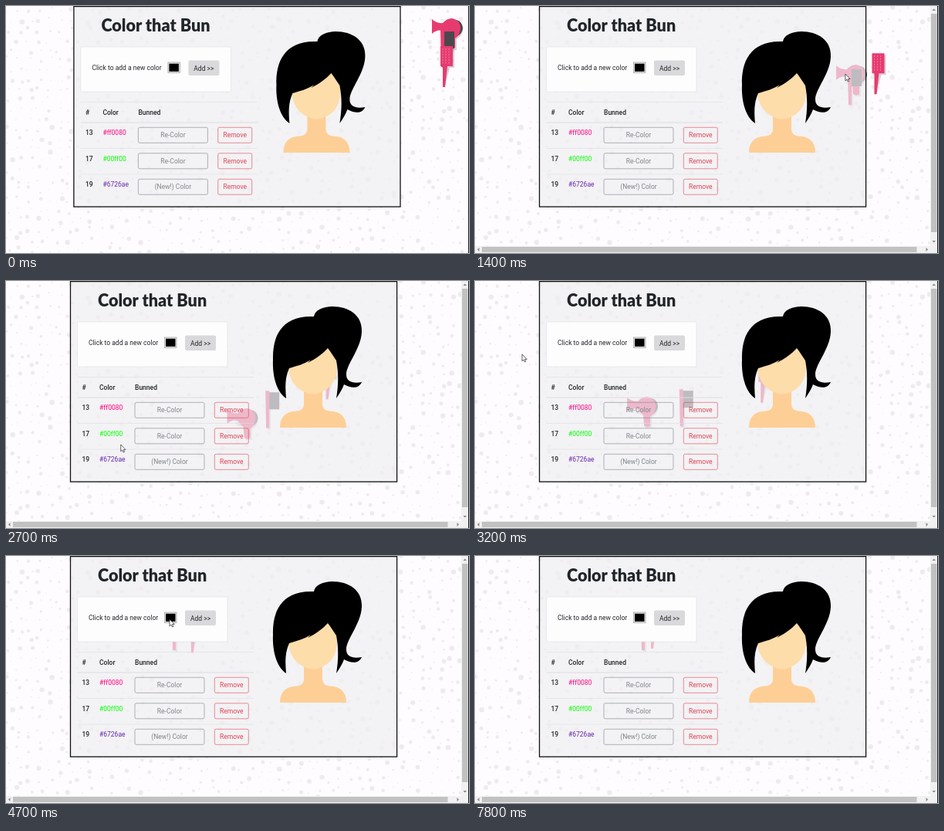
An HTML page for the animation above (8 s loop, 600 by 320 pixels).

```html
<!DOCTYPE html>
<html lang="en">
<head>
<meta charset="utf-8">
<title>Color that Bun</title>
<style>
  html, body { margin: 0; height: 100%; overflow: hidden; background: #fefcfe; }
  svg { display: block; width: 600px; height: 320px; font: 8.53px Roboto, sans-serif; fill: #212529; }
  .title { font: 900 21.6px Lato, sans-serif; }
  .strong { font-weight: 500; }
  .mid { text-anchor: middle; }
  .shadow { fill: #8b7d86; opacity: .35; }
  .pink { fill: #e73b70; }
  .dark { fill: #4b474c; }
</style>
</head>
<body>
<svg viewBox="0 0 600 320">
  <g id="dots" fill="#eeebef"></g>

  <g id="dryer">
    <path class="shadow" d="M12 9Q23 0 36 6Q44 14 36 24L32 27V41H24L22 25L12 21Z"/>
    <path class="dark" d="M32 2Q40 5 40 13Q39 20 33 23Z"/>
    <path class="pink" d="M0 1Q6 7 14 6Q19 0 26 0Q37 2 37 13Q36 22 30 26V38Q26 41 22 38L21 24Q17 21 14 16Q6 14 0 20Z"/>
  </g>
  <g id="comb">
    <path class="shadow" d="M2 2H18V22H7V50H2Z"/>
    <path class="dark" d="M4 2H18V24H4Z"/>
    <path class="pink" d="M0 0H5V48H1Z"/>
  </g>
  <g id="brush">
    <path class="shadow" d="M2 2H18V28H12L5 55V28H2Z"/>
    <path class="pink" d="M0 0H16V26H9L6 53H3V26H0Z"/>
    <path d="M3 3V24M7 3V24M11 3V24" stroke="#f17fa4" stroke-dasharray="2 1.5"/>
  </g>

  <g id="page">
    <rect x="83.5" y=".6" width="423.1" height="259.500" fill="#efeef1" fill-opacity=".7" stroke="#111" stroke-width="1.3"/>
    <text class="title" x="119" y="32.8">Color that Bun</text>

    <rect x="92.5" y="53" width="194.5" height="58" rx="1.5" fill="#fefdfe" stroke="#dfdde0" stroke-width=".6"/>
    <text x="107" y="83">Click to add a new color</text>
    <rect x="205.5" y="73" width="15.5" height="13.5" fill="#e6e5e7" stroke="#8a8a8a" stroke-width=".6"/>
    <rect x="207" y="74.700" width="12.5" height="10.2" fill="#000"/>
    <rect x="232" y="70.5" width="40" height="19.6" rx="2" fill="#d9d8da"/>
    <text class="mid" x="252" y="83.6">Add &gt;&gt;</text>

    <path d="M92.5 124.5H321M92.5 184.5H321M92.5 218H321" stroke="#dedfe3" stroke-width=".6"/>
    <path d="M92.5 151H321" stroke="#dedfe3" stroke-width="1.1"/>
    <g class="strong">
      <text x="98.5" y="140.8">#</text>
      <text x="121" y="140.8">Color</text>
      <text x="167" y="140.8">Bunned</text>
    </g>
    <g id="rows"></g>

    <path d="M386 138H410V160Q410 167 419 168.500Q441 169 441 190H355Q355 169 377 168.500Q386 167 386 160Z" fill="#fdcf96"/>
    <path d="M366 84H429V113Q428 134 411 143Q398 150 385 143Q368 134 366 113Z" fill="#fdddaa"/>
    <path fill="#000" d="M399 46C400 38 411 33 423 33C444 33 462 44 461 66C460 88 441 108 441 121
      C441 131 450 133 461 131C457 140 447 139 438 134C436 140 432 146 428 152C431 133 431 119 428 103
      C424 97 421 92 417 87C411 94 401 101 391 106L395 102C386 108 377 110 367 113
      C361 126 362 139 363 152C351 144 345 124 346 102C345 72 357 44 399 46Z"/>
  </g>

  <g id="bars">
    <path d="M590 0H600V320H0V311H590Z" fill="#f1f1f1"/>
    <path d="M591 10H598.500V293H591ZM9 312H572.500V319H9Z" fill="#c1c1c1"/>
    <path d="M592.500 6L594.700 3.500L597 6ZM592.500 304L594.700 306.500L597 304ZM5.500 313L3 315.500L5.500 318ZM584.500 313L587 315.500L584.500 318Z" fill="#888"/>
  </g>
  <path d="M599.500 0V320" stroke="#222"/>
  <path id="cursor" d="M0 0V8.800L2 7L3.400 10L4.800 9.400L3.500 6.500H6.200Z" fill="#fff" stroke="#222" stroke-width=".7"/>
</svg>
<script>
const LOOP = 8000, STEP = 10, ENTER = 300, SCROLLBARS_AT = 400, CURSOR_GONE_AT = 5000;
const el = id => document.getElementById(id);
const place = (id, x, y) => el(id).setAttribute('transform', `translate(${x.toFixed(2)} ${y.toFixed(2)})`);

// Mouse stops as [time, x, y]
const mouse = [[ENTER, 585, 18], [700, 545, 41], [1400, 480, 88], [1750, 425, 65], [2200, 323, 189],
               [2550, 190, 238], [3200, 61, 95], [4700, 212, 82]];

// The tools chase the mouse, each at its own top speed in px per second
const tools = [
  { id: 'dryer', start: [552, 16], offset: [-12, -12], speed: 185 },
  { id: 'comb', start: [563, 31], offset: [3, -8], speed: 145 },
  { id: 'brush', start: [563, 52], offset: [13, -15], speed: 90 }
];

// Smooth curve through the stops, at rest at both ends
function mouseAt(time) {
  const last = mouse.length - 1;
  const t = Math.min(Math.max(time, mouse[0][0]), mouse[last][0]);
  const i = Math.max(0, mouse.findIndex(stop => stop[0] >= t) - 1);
  const a = mouse[i], b = mouse[i + 1], span = b[0] - a[0], u = (t - a[0]) / span;
  const slope = (k, axis) => k === 0 || k === last ? 0 :
    (mouse[k + 1][axis] - mouse[k - 1][axis]) / (mouse[k + 1][0] - mouse[k - 1][0]);
  return [1, 2].map(axis => a[axis] + (b[axis] - a[axis]) * u * u * (3 - 2 * u) +
    span * u * (1 - u) * ((1 - u) * slope(i, axis) - u * slope(i + 1, axis)));
}

function chase({ start: [x, y], offset, speed }) {
  const track = [];
  for (let t = 0; t <= LOOP; t += STEP) {
    if (t >= ENTER) {
      const [mx, my] = mouseAt(t);
      const dx = mx + offset[0] - x, dy = my + offset[1] - y;
      const part = Math.min(1, speed * STEP / 1000 / (Math.hypot(dx, dy) || 1));
      x += dx * part;
      y += dy * part;
    }
    track.push([x, y]);
  }
  return track;
}

function buildDots() {
  let seed = 7, out = '';
  const random = () => (seed = seed * 16807 % 2147483647) / 2147483647;
  for (let y = 0; y < 330; y += 13)
    for (let x = 0; x < 610; x += 13) {
      const cx = x + random() * 9, cy = y + random() * 9, r = 0.7 + random() ** 2 * 2.6;
      out += `<circle cx="${cx.toFixed(1)}" cy="${cy.toFixed(1)}" r="${r.toFixed(1)}"/>`;
    }
  el('dots').innerHTML = out;
}

function button(x, y, width, label, color) {
  return `<rect x="${x}" y="${y}" width="${width}" height="20" rx="2" fill="none" stroke="${color}" stroke-width=".6"/>
    <text class="mid" x="${x + width / 2}" y="${y + 13}" fill="${color}">${label}</text>`;
}

function buildRows() {
  const rows = [[13, '#ff0080', 'Re-Color'], [17, '#00ff00', 'Re-Color'], [19, '#6726ae', '(New!) Color']];
  el('rows').innerHTML = rows.map(([id, color, label], i) => {
    const y = 157.3 + i * 33.5;
    return `<text class="strong" x="98.5" y="${y + 9.9}">${id}</text>
      <text x="121" y="${y + 9.9}" fill="${color}">${color}</text>` +
      button(167, y, 90, label, '#7f848a') + button(270.3, y, 44, 'Remove', '#dc4453');
  }).join('');
}

function draw(now) {
  const t = now % LOOP, scrolled = t >= SCROLLBARS_AT;
  for (const tool of tools) place(tool.id, ...tool.track[Math.floor(t / STEP)]);
  place('cursor', ...mouseAt(t));
  place('page', scrolled ? 0 : 4.4, 0);
  el('bars').style.display = scrolled ? '' : 'none';
  el('cursor').style.display = scrolled && t < CURSOR_GONE_AT ? '' : 'none';
  requestAnimationFrame(draw);
}

for (const tool of tools) tool.track = chase(tool);
buildDots();
buildRows();
draw(performance.now());
</script>
</body>
</html>
```
